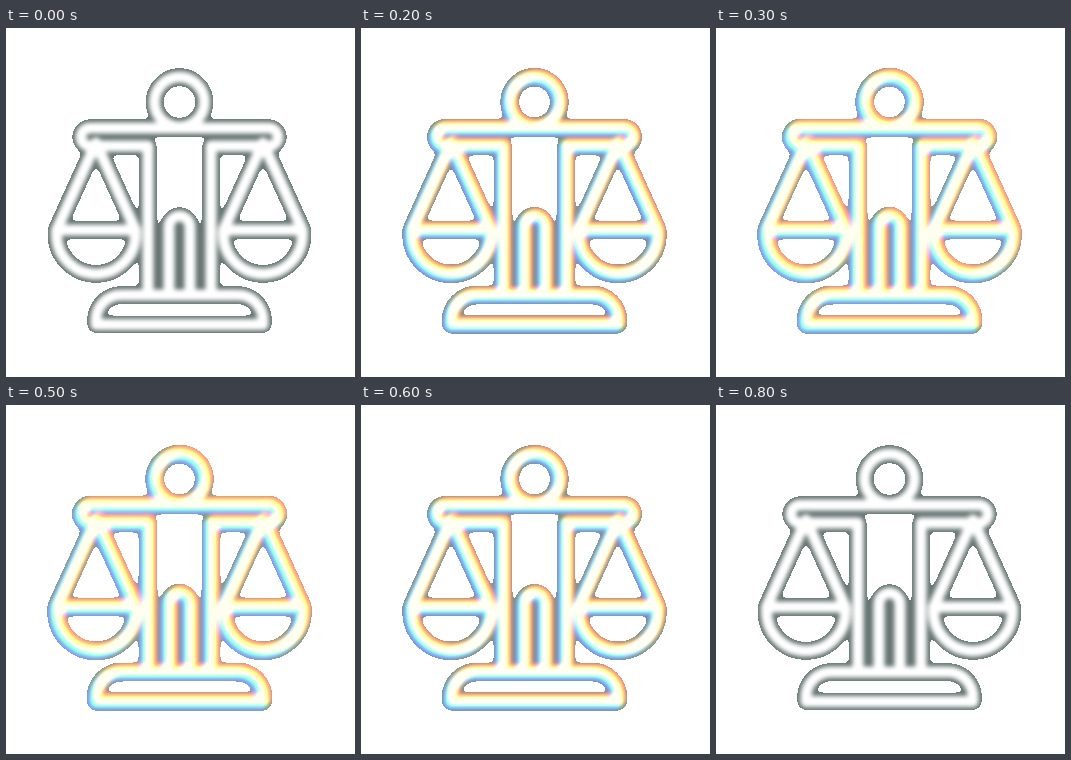
These frames come from a looping animation (349 px wide and 349 px high, 900 ms). An HTML page with a canvas:

```html
<!DOCTYPE html>
<html lang="en">
<head>
<meta charset="utf-8">
<title>Scales</title>
<style>
  html, body { margin: 0; width: 100%; height: 100%; overflow: hidden; background: #fff; }
  canvas { display: block; width: 349px; height: 349px; }
</style>
</head>
<body>
<canvas id="stage" width="349" height="349"></canvas>
<script>
const SIZE = 349;
const STEP = 100;
const SPLITS = [0, 1.5, 2.4, 3, 3.3, 3, 2.4, 1.5, 0];
const SHADE = [0.4, 0.46, 0.45];

const pan = x => `M${x - 39.5} 202H${x + 39.5}V206.500A39.500 39.500 0 0 1 ${x - 39.5} 206.500Z
  M${x - 39.5} 202L${x} 115L${x + 39.5} 202`;

const icon = new Path2D(`
  M148.500 74a25 25 0 1 0 50 0a25 25 0 1 0 -50 0
  M142 267V118H84A9 9 0 0 1 84 100H263A9 9 0 0 1 263 118H205V267
  M163 267V198.500A10.500 10.500 0 0 1 184 198.500V267
  M90 296.500V292A25 25 0 0 1 115 267H232A25 25 0 0 1 257 292V296.500Z
  ${pan(90)} ${pan(257)}`);

// Alpha of the outline, blurred and moved along the rising diagonal.
function outline(width, blur, shift = 0) {
  const layer = document.createElement('canvas');
  layer.width = layer.height = SIZE;
  const pen = layer.getContext('2d', { willReadFrequently: true });
  pen.filter = `blur(${blur}px)`;
  pen.translate(shift, -shift);
  pen.lineWidth = width;
  pen.lineJoin = pen.lineCap = 'round';
  pen.stroke(icon);
  const { data } = pen.getImageData(0, 0, SIZE, SIZE);
  return i => data[i + 3] / 255;
}

const halo = outline(16, 3);

// White tubes in a shaded halo with a hard rim: red moves up-right, blue down-left.
function render(split) {
  const image = new ImageData(SIZE, SIZE);
  const tubes = [split, 0, -split].map(shift => outline(11, 2, shift));
  const rim = 0.39 - 0.02 * split;
  const gain = 1 + 0.15 * split;
  const cream = [0, 0, 0.02 * split];
  for (let i = 0; i < image.data.length; i += 4) {
    const inside = halo(i) >= rim;
    tubes.forEach((tube, c) => {
      const shade = SHADE[c] + 0.04 * split;
      const light = shade + (1 - shade) * Math.min(1, gain * tube(i)) - cream[c];
      image.data[i + c] = inside ? 255 * light : 255;
    });
    image.data[i + 3] = 255;
  }
  return image;
}

const ctx = document.getElementById('stage').getContext('2d');
const poses = new Map([...new Set(SPLITS)].map(split => [split, render(split)]));
const start = performance.now();

function draw() {
  const elapsed = Math.max(0, performance.now() - start);
  const step = Math.floor(elapsed / STEP) % SPLITS.length;
  ctx.putImageData(poses.get(SPLITS[step]), 0, 0);
  requestAnimationFrame(draw);
}
draw();
</script>
</body>
</html>
```
